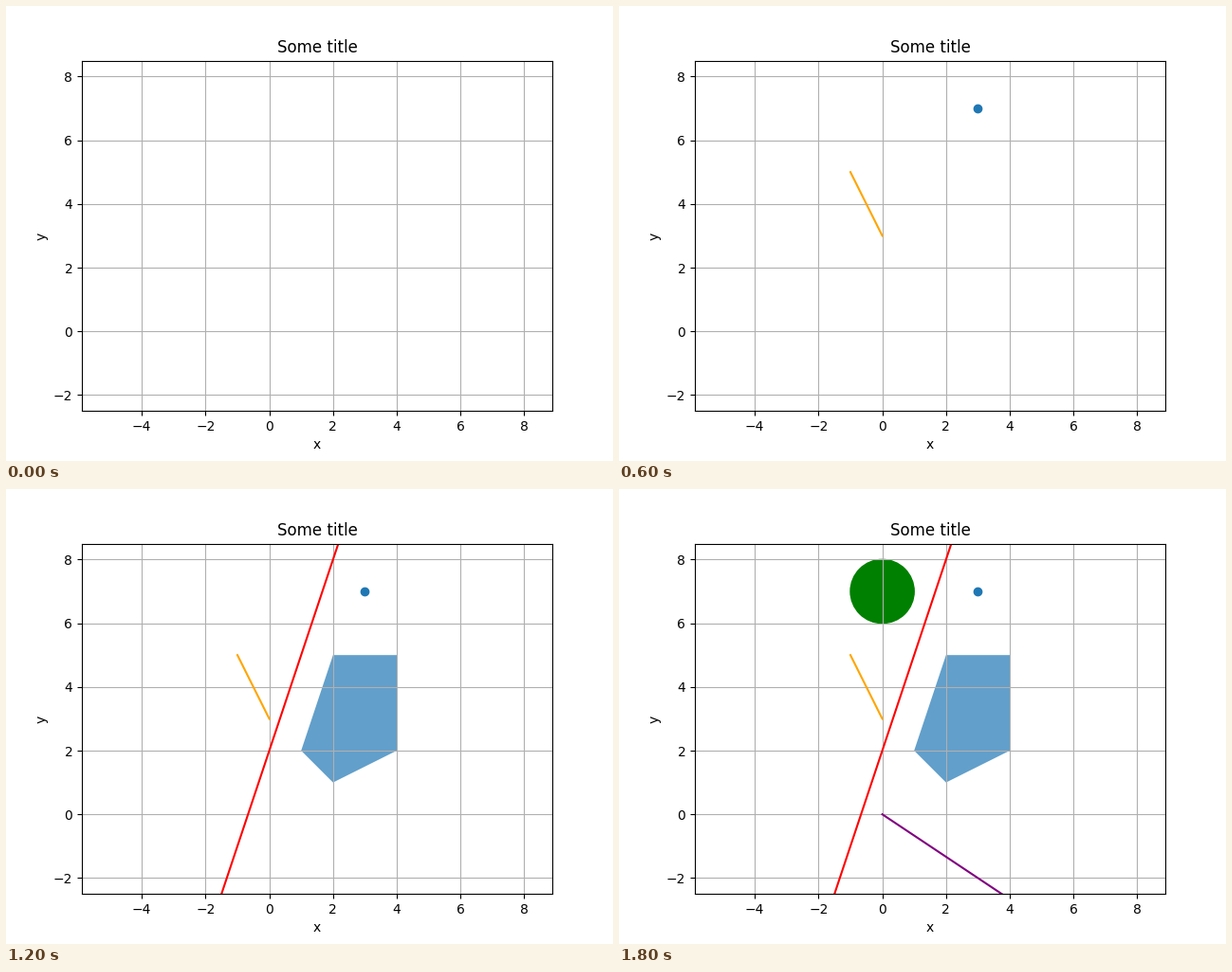
Recreate the animation shown at these times as a matplotlib script. Size 640 px wide and 480 px high, loop 2100 ms.

```python
import matplotlib.pyplot as plt
from matplotlib.animation import FuncAnimation
from matplotlib.patches import Circle, Polygon

fig, ax = plt.subplots(figsize=(6.4, 4.8), dpi=100)

# Equal units on both axes: 33.6 px each in the 496 x 369.6 px plot area
half_width = 496 / 33.6 / 2
ax.set_xlim(1.5 - half_width, 1.5 + half_width)
ax.set_ylim(-2.5, 8.5)
ax.set_title("Some title")
ax.set_xlabel("x")
ax.set_ylabel("y")
ax.grid(True)

point, = ax.plot(3, 7, "o", color="C0")
segment, = ax.plot([-1, 0], [5, 3], color="orange")
line, = ax.plot([-3, 4], [-7, 14], color="red")
pentagon = ax.add_patch(Polygon([(2, 1), (4, 2), (4, 5), (2, 5), (1, 2)],
                                facecolor="C0", alpha=0.7))
circle = ax.add_patch(Circle((0, 7), 1, color="green"))
ray, = ax.plot([0, 6], [0, -4], color="purple")

shapes = [point, segment, line, pentagon, circle, ray]


def update(step):
    """Show one more shape at every step, starting from an empty plot."""
    for i, shape in enumerate(shapes):
        shape.set_visible(i < step)
    return shapes


anim = FuncAnimation(fig, update, frames=len(shapes) + 1, interval=300,
                     repeat=True, repeat_delay=0, blit=False)
plt.show()
```
